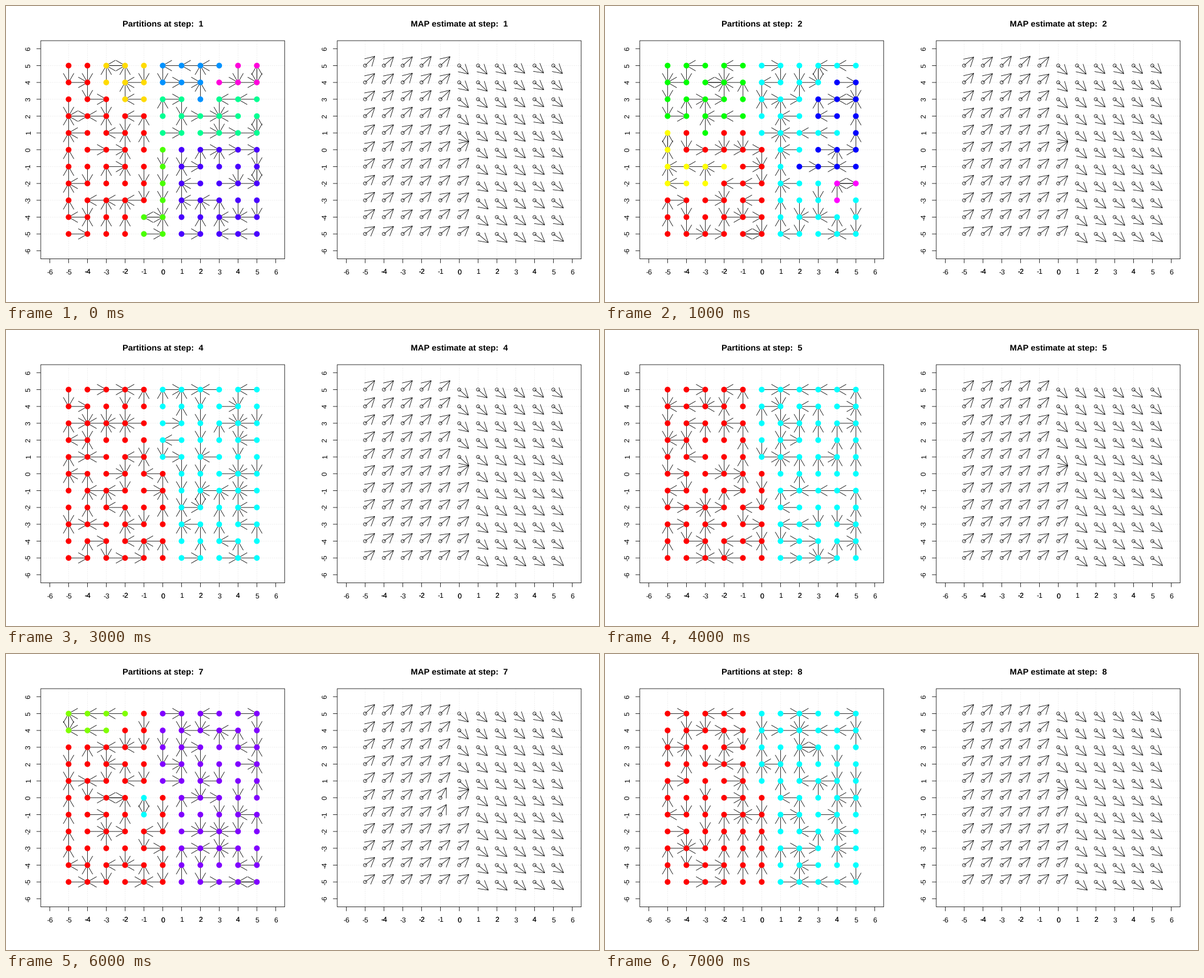
Write a matplotlib script that moves like this. It is 1008 by 504 pixels and loops after 8 s.

```python
import colorsys
import random

import matplotlib.pyplot as plt
import numpy as np
from matplotlib.animation import FuncAnimation
from matplotlib.collections import LineCollection
from matplotlib.patches import Rectangle

plt.rcParams["font.family"] = "Liberation Sans"
plt.rcParams["text.hinting"] = "none"

WIDTH, HEIGHT, DPI = 1008, 504, 72
STEPS = 8
LINE = 14.4                      # height of one margin line
LIMIT = 6.48                     # axis range in grid units
TOP, BOTTOM = 4.1 * LINE, HEIGHT - 5.1 * LINE
HALF_W, HALF_H = (WIDTH / 2 - 6.2 * LINE) / 2, (BOTTOM - TOP) / 2
LEFT, MIDDLE = 4.1 * LINE + HALF_W, TOP + HALF_H
RIGHT = LEFT + WIDTH / 2
HEAD, HEAD_ANGLE = 18, np.radians(30)
STROKE = 0.8
CELLS = [(x, y) for y in range(5, -6, -1) for x in range(-5, 6)]

# Extra clusters inside a half: (cluster, center x, center y, radius x, radius y).
PATCHES = {
    1: [(3, 3, 2, 9, 1.2), (4, 1.7, 4.8, 1.9, 1.9), (6, 4.2, 4.3, 1.3, 1.3),
        (1, -1.7, 4.4, 1.6, 1.6), (2, 0, -4.5, 1.05, 4.6)],
    2: [(2, -3, 5, 4, 4.1), (1, -5, 0.5, 0.5, 0.7), (1, -3.9, -1.3, 2.05, 0.9),
        (4, 4.3, 2.9, 1.65, 1.65), (4, 4.6, -0.6, 2.7, 1.63),
        (5, 4.4, -2.3, 0.9, 0.9)],
    7: [(1, -3.6, 5.1, 1.7, 2), (2, -1, -0.5, 0.5, 0.6)],
}
RIGHT_CLUSTER = {1: 5, 2: 3, 7: 3}


def to_pixels(cell, center):
    x, y = cell
    return np.array([center + x * HALF_W / LIMIT, MIDDLE - y * HALF_H / LIMIT])


def in_left_half(x, y):
    return x < 0 or (x == 0 and y <= 0)


def partition(step):
    """Map every cell to its cluster: two halves with elliptic patches."""
    right = RIGHT_CLUSTER.get(step, 1)
    cluster = {c: 0 if in_left_half(*c) else right for c in CELLS}
    for k, cx, cy, rx, ry in PATCHES.get(step, []):
        for x, y in CELLS:
            inside = ((x - cx) / rx) ** 2 + ((y - cy) / ry) ** 2 <= 1
            if inside and in_left_half(x, y) == in_left_half(cx, cy):
                cluster[x, y] = k
    return cluster


def random_links(cluster, rng):
    """Link each cell to a neighbour, forming one random tree per cluster."""
    def neighbours(cell):
        x, y = cell
        near = [(x + 1, y), (x - 1, y), (x, y + 1), (x, y - 1)]
        return [c for c in near if cluster.get(c) == cluster[cell]]

    link = {}
    for k in sorted(set(cluster.values())):
        members = [c for c in CELLS if cluster[c] == k]
        root = rng.choice(members)
        tree = {root}
        for start in members:
            cell = start
            while cell not in tree:
                link[cell] = rng.choice(neighbours(cell))
                cell = link[cell]
            cell = start
            while cell not in tree:
                tree.add(cell)
                cell = link[cell]
        link[root] = rng.choice(neighbours(root))
    return link


def arrow(tail, tip):
    """Shaft and open head as two polylines."""
    back = np.arctan2(*(tail - tip)[::-1])
    barbs = [tip + HEAD * np.array([np.cos(back + a), np.sin(back + a)])
             for a in (HEAD_ANGLE, -HEAD_ANGLE)]
    return [np.array([tail, tip]), np.array([barbs[0], tip, barbs[1]])]


def estimate(cell, step, cluster, rng):
    """Estimated direction at a cell, in pixels."""
    x, y = cell
    spread = 0.8 if step < 3 else 0.3
    noise = rng.uniform(-spread, spread)
    if step == 7 and cluster == 2:
        return np.array([10, -17])
    if in_left_half(x, y):
        return np.array([16.4, -14 - 0.25 * y + noise])
    return np.array([16.5 - 0.2 * y, 14.5 - 0.3 * x + noise])


def add_lines(segments=(), color="black", zorder=2, **style):
    lines = LineCollection(segments, colors=color, linewidths=STROKE,
                           zorder=zorder, **style)
    lines.set_snap(False)
    return ax.add_collection(lines)


def draw_panel(center):
    left, right = center - HALF_W, center + HALF_W
    grid, ticks = [], []
    for i in range(-6, 7):
        x, y = to_pixels((i, i), center)
        if abs(i) < 6:
            grid += [[(x, BOTTOM), (x, TOP)], [(left, y), (right, y)]]
        ticks += [[(x, BOTTOM), (x, BOTTOM + LINE / 2)],
                  [(left, y), (left - LINE / 2, y)]]
        # Even labels are printed twice, which makes them look heavier.
        for _ in range(2 if i % 2 == 0 and abs(i) < 6 else 1):
            ax.text(x, BOTTOM + 1.8 * LINE, str(i), size=12,
                    ha="center", va="baseline")
        ax.text(left - 1.2 * LINE, y, str(i), size=12, ha="center",
                va="baseline", rotation=90, rotation_mode="anchor")
    add_lines(grid, "lightgray", 1, linestyles=[(0, (1, 3))])
    add_lines(ticks)
    ax.add_patch(Rectangle((left, TOP), 2 * HALF_W, 2 * HALF_H, fill=False,
                           lw=STROKE, zorder=2, snap=False))
    return ax.text(center, 34.7, "", size=14.4, weight="bold",
                   ha="center", va="baseline")


fig = plt.figure(figsize=(WIDTH / DPI, HEIGHT / DPI), dpi=DPI,
                 facecolor="white")
ax = fig.add_axes([0, 0, 1, 1])
ax.set_xlim(0, WIDTH)
ax.set_ylim(HEIGHT, 0)
ax.axis("off")

left_title, right_title = draw_panel(LEFT), draw_panel(RIGHT)
left_points = np.array([to_pixels(c, LEFT) for c in CELLS])
right_points = np.array([to_pixels(c, RIGHT) for c in CELLS])
link_arrows, map_arrows = add_lines(zorder=3), add_lines(zorder=3)
dots = ax.scatter(*left_points.T, s=9.75 ** 2, linewidths=0, zorder=4)
ax.scatter(*right_points.T, s=5.4 ** 2, facecolors="none",
           edgecolors="black", linewidths=STROKE, zorder=4)


def update(frame):
    step = frame + 1
    left_title.set_text(f"Partitions at step:  {step}")
    right_title.set_text(f"MAP estimate at step:  {step}")

    cluster = partition(step)
    count = max(cluster.values()) + 1
    dots.set_facecolors([colorsys.hsv_to_rgb(cluster[c] / count, 1, 1)
                         for c in CELLS])
    link = random_links(cluster, random.Random(step))
    link_arrows.set_segments([
        line for c in CELLS
        for line in arrow(to_pixels(c, LEFT), to_pixels(link[c], LEFT))])

    rng = random.Random(min(step, 3))
    map_arrows.set_segments([
        line for c, tail in zip(CELLS, right_points)
        for line in arrow(tail, tail + estimate(c, step, cluster[c], rng))])
    return dots, link_arrows, map_arrows, left_title, right_title


animation = FuncAnimation(fig, update, frames=STEPS, interval=1000,
                          repeat=True, repeat_delay=0, blit=False)
plt.show()
```
